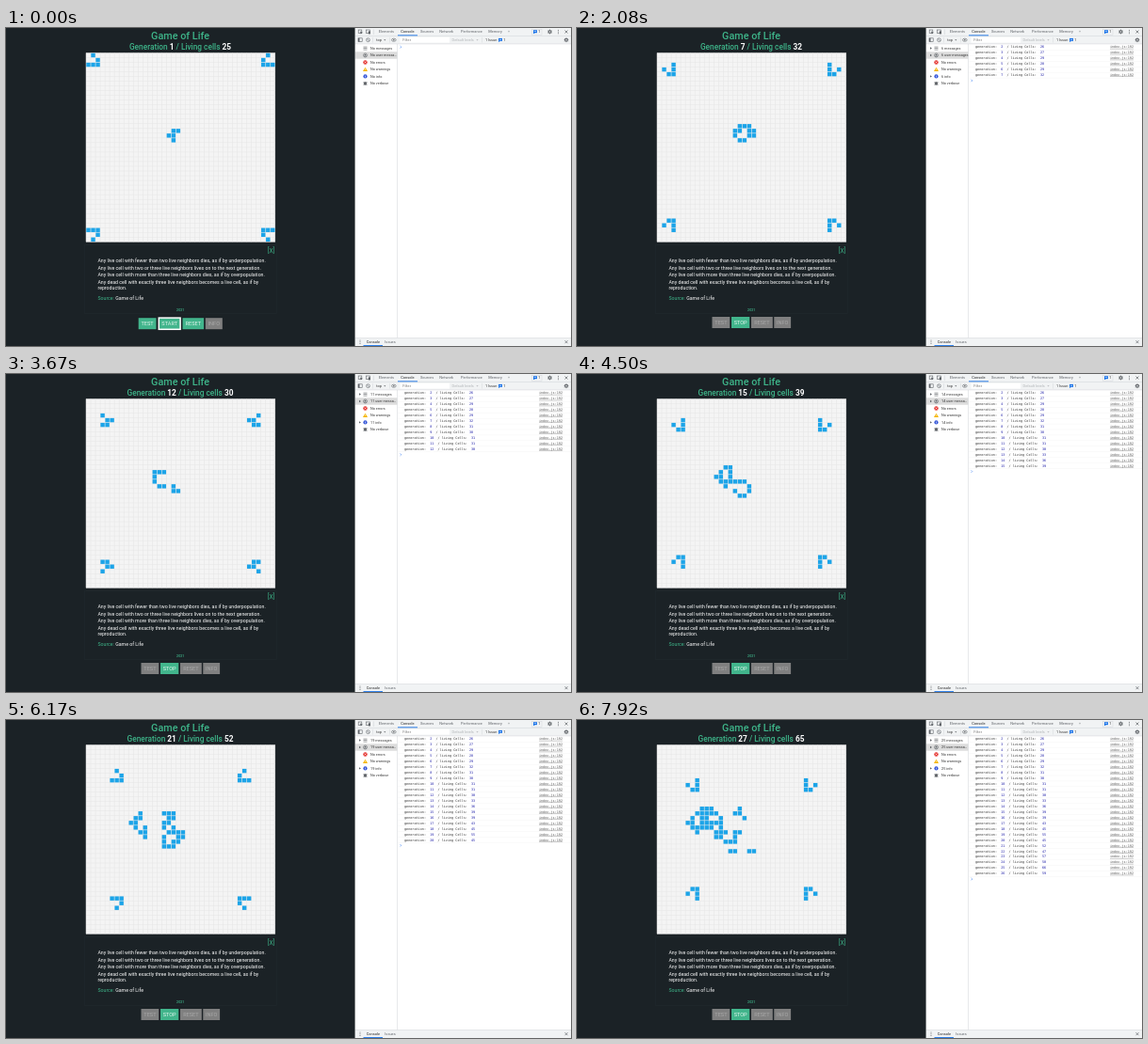
Write an HTML page with a canvas that moves like this. It is 600 by 338 pixels and loops after 8000 ms.

```html
<!DOCTYPE html>
<html lang="en">
<head>
<meta charset="utf-8">
<title>Game of Life</title>
<style>
  html, body { margin: 0; width: 100%; height: 100%; overflow: hidden; background: #1b2226; }
  canvas { display: block; width: 600px; height: 338px; }
</style>
</head>
<body>
<canvas id="stage"></canvas>
<script>
const LOOP = 8000, CLICK = 80, START = 100, STEP = 300, LOG_DELAY = 80;
const SIZE = 40, BOARD = { x: 85, y: 26.5, cell: 5.02 };
const SANS = 'Roboto, sans-serif', MONO = '"DejaVu Sans Mono", monospace';
const GREEN = '#3eb489', BLUE = '#1a73e8', GREY = '#5f6368', BAR = '#f1f3f4', LINE = '#cfd2d6';

const canvas = document.getElementById('stage');
const ratio = window.devicePixelRatio || 1;
canvas.width = 600 * ratio;
canvas.height = 338 * ratio;
const ctx = canvas.getContext('2d');
ctx.scale(ratio, ratio);

// --- simulation ---
function seed() {
  const cells = [[16, 18], [16, 19], [17, 17], [17, 18], [18, 18]];
  const glider = [[0, 1], [1, 2], [2, 0], [2, 1], [2, 2]];
  const far = SIZE - 1;
  for (const [r, c] of glider) {
    cells.push([r, c], [r, far - c], [far - r, c], [far - r, far - c]);
  }
  return new Set(cells.map(([r, c]) => r * SIZE + c));
}

function evolve(live) {
  const neighbours = new Map();
  for (const id of live) {
    const row = Math.floor(id / SIZE), col = id % SIZE;
    for (let r = row - 1; r <= row + 1; r++) {
      for (let c = col - 1; c <= col + 1; c++) {
        const key = r * SIZE + c;
        if (r < 0 || c < 0 || r >= SIZE || c >= SIZE || key === id) continue;
        neighbours.set(key, (neighbours.get(key) || 0) + 1);
      }
    }
  }
  const next = new Set();
  for (const [key, n] of neighbours) {
    if (n === 3 || (n === 2 && live.has(key))) next.add(key);
  }
  return next;
}

const generations = [null, seed()];
while (generations.length < 28) generations.push(evolve(generations.at(-1)));

const generationAt = t => Math.min(27, 1 + Math.max(0, Math.floor((t - START) / STEP)));

// --- drawing helpers ---
function rect(x, y, w, h, color) {
  ctx.fillStyle = color;
  ctx.fillRect(x, y, w, h);
}

// Draws text centred vertically on y and returns the x where it ends.
function text(str, x, y, size, color, { weight = 400, align = 'left', family = SANS } = {}) {
  ctx.font = `${weight} ${size}px ${family}`;
  ctx.textAlign = align;
  ctx.fillStyle = color;
  ctx.fillText(str, x, y + size * 0.355);
  return x + ctx.measureText(str).width;
}

function stroke(color, width, ...points) {
  ctx.strokeStyle = color;
  ctx.lineWidth = width;
  ctx.beginPath();
  points.forEach(([x, y]) => ctx.lineTo(x, y));
  ctx.stroke();
}

function box(x, y, w, h, color, width = 0.6) {
  ctx.strokeStyle = color;
  ctx.lineWidth = width;
  ctx.strokeRect(x, y, w, h);
}

function disc(x, y, r, color, outline) {
  ctx.beginPath();
  ctx.arc(x, y, r, 0, 2 * Math.PI);
  ctx.fillStyle = ctx.strokeStyle = color;
  ctx.lineWidth = outline || 0;
  if (outline) ctx.stroke(); else ctx.fill();
}

function triangle(color, ...points) {
  ctx.fillStyle = color;
  ctx.beginPath();
  points.forEach(([x, y]) => ctx.lineTo(x, y));
  ctx.fill();
}

function cross(x, y, r, color, width = 0.7) {
  stroke(color, width, [x - r, y - r], [x + r, y + r]);
  stroke(color, width, [x - r, y + r], [x + r, y - r]);
}

const dots = (x, y) => [-1.7, 0, 1.7].forEach(d => disc(x, y + d, 0.5, GREY));
const arrowDown = (x, y, color) => triangle(color, [x - 1.1, y - 0.6], [x + 1.1, y - 0.6], [x, y + 0.8]);

function gear(x, y) {
  for (let i = 0; i < 4; i++) {
    const a = i * Math.PI / 4, dx = 2.4 * Math.cos(a), dy = 2.4 * Math.sin(a);
    stroke(GREY, 0.8, [x - dx, y - dy], [x + dx, y + dy]);
  }
  disc(x, y, 1.8, GREY);
  disc(x, y, 0.8, BAR);
}

function issueBadge(x, y) {
  rect(x - 2, y - 1.8, 4, 3, BLUE);
  triangle(BLUE, [x - 2, y + 1], [x, y + 1], [x - 2, y + 2.2]);
  rect(x - 1.2, y - 0.6, 2.4, 0.5, '#fff');
  text('1', x + 3.3, y, 3.8, '#333');
}

// --- game page ---
function drawHeader(gen, count) {
  text('Game of Life', 185, 8.2, 10.8, GREEN, { weight: 500, align: 'center' });
  const parts = ['Generation ', gen, ' / Living cells ', count];
  const weight = i => (i % 2 ? 700 : 500);
  const width = parts.reduce((sum, part, i) => {
    ctx.font = `${weight(i)} 8.3px ${SANS}`;
    return sum + ctx.measureText(part).width;
  }, 0);
  let x = 185 - width / 2;
  parts.forEach((part, i) => {
    x = text(part, x, 20.2, 8.3, i % 2 ? '#fff' : GREEN, { weight: weight(i) });
  });
}

function drawBoard(live) {
  const { x, y, cell } = BOARD, side = SIZE * cell;
  rect(x, y, side, side, '#f4f4f4');
  for (let i = 0; i <= SIZE; i++) {
    rect(x + i * cell - 0.25, y, 0.5, side, '#e4e4e4');
    rect(x, y + i * cell - 0.25, side, 0.5, '#e4e4e4');
  }
  for (const id of live) {
    rect(x + (id % SIZE) * cell + 0.3, y + Math.floor(id / SIZE) * cell + 0.3, cell - 0.6, cell - 0.6, '#1ca4e8');
  }
}

function drawInfo() {
  box(83.5, 230.5, 204, 73, '#20292d');
  text('[X]', 281.5, 236.3, 6.6, GREEN, { align: 'center' });
  const rules = [
    [247.6, 'Any live cell with fewer than two live neighbors dies, as if by underpopulation.'],
    [255.1, 'Any live cell with two or three live neighbors lives on to the next generation.'],
    [262.6, 'Any live cell with more than three live neighbors dies, as if by overpopulation.'],
    [270.1, 'Any dead cell with exactly three live neighbors becomes a live cell, as if by'],
    [276.2, 'reproduction.']
  ];
  for (const [y, rule] of rules) text(rule, 97.4, y, 5.24, '#fff');
  const x = text('Source: ', 97.4, 287.2, 5.24, GREEN);
  text('Game of Life', x, 287.2, 5.24, '#fff');
  text('2021', 185.2, 299.7, 3.6, GREEN, { weight: 500, align: 'center' });
}

function drawButtons(running) {
  const y = running ? 307 : 308.2, h = 12;
  const buttons = running
    ? [['TEST', 143.5, 18.8, 0], ['STOP', 164, 19.3, 1], ['RESET', 185, 22.8, 0], ['INFO', 209.3, 17.8, 0]]
    : [['TEST', 140.7, 18.8, 1], ['START', 162.3, 22.8, 1], ['RESET', 187.5, 22.6, 1], ['INFO', 211.8, 18, 0]];
  for (const [label, x, w, enabled] of buttons) {
    rect(x, y, w, h, enabled ? '#42b58c' : '#808080');
    if (label === 'START') box(x, y - 0.1, w, h + 0.2, '#fff', 1.5);
    text(label, x + w / 2, y + h / 2, 5.6, enabled ? '#e2f5ed' : '#a9a9a9', { align: 'center' });
  }
}

// --- developer tools ---
function drawToolbars() {
  rect(371, 0, 229, 17, BAR);
  rect(371, 8.2, 229, 0.5, LINE);
  rect(371, 16.7, 229, 0.5, LINE);

  box(374.2, 2, 3.6, 3.6, GREY);
  triangle(GREY, [376, 3.6], [378.8, 4.8], [376.8, 6.6]);
  box(382.3, 2, 4, 3.6, GREY);
  rect(384.8, 3.4, 2.2, 3, GREY);
  rect(390, 1.5, 0.5, 5.5, LINE);
  const tabs = [['Elements', 395.8], ['Console', 419.3], ['Sources', 440], ['Network', 460.3],
    ['Performance', 483], ['Memory', 512.3], ['»', 533]];
  for (const [label, x] of tabs) text(label, x, 4, 3.95, label === 'Console' ? '#222' : GREY);
  rect(416, 7.4, 21, 0.9, BLUE);
  box(558.4, 1.2, 10.6, 6, LINE, 0.4);
  issueBadge(562, 4);
  gear(577.5, 4);
  dots(586.5, 4);
  cross(595, 4, 1.5, GREY);

  box(374, 10.8, 4.2, 3.8, GREY);
  rect(374, 10.8, 1.5, 3.8, GREY);
  disc(384.5, 12.7, 1.9, GREY, 0.6);
  stroke(GREY, 0.6, [383.2, 11.4], [385.8, 14]);
  rect(389.6, 9.8, 0.4, 5.8, LINE);
  text('top', 393.2, 12.7, 3.9, '#333');
  arrowDown(402.3, 12.8, GREY);
  rect(407, 9.8, 0.4, 5.8, LINE);
  ctx.beginPath();
  ctx.ellipse(411.8, 12.7, 2.4, 1.5, 0, 0, 2 * Math.PI);
  ctx.strokeStyle = GREY;
  ctx.lineWidth = 0.6;
  ctx.stroke();
  disc(411.8, 12.7, 0.8, GREY);
  rect(418.5, 9.8, 52.5, 5.8, '#fff');
  text('Filter', 421.3, 12.7, 3.9, '#757575');
  text('Default levels', 473.6, 12.7, 3.9, '#b0b3b6');
  arrowDown(500.5, 12.8, '#b0b3b6');
  rect(505, 9.8, 0.4, 5.8, LINE);
  text('1 Issue:', 509, 12.7, 3.8, '#333');
  issueBadge(525, 12.7);
  gear(595, 12.7);
}

function drawSidebar(count) {
  const n = count || 'No';
  const user = count > 0 && count < 10 ? 'user messages' : 'user messa…';
  const labels = [`${n} messages`, `${n} ${user}`, 'No errors', 'No warnings', `${n} info`, 'No verbose'];
  const rowY = i => 21.5 + i * 7.48;
  rect(371, 25.3, 44.5, 7.4, '#dcdcdc');
  labels.forEach((label, i) => {
    text(label, 387, rowY(i), 3.8, '#333');
    if (count && [0, 1, 4].includes(i)) {
      triangle(GREY, [375, rowY(i) - 1.2], [377, rowY(i)], [375, rowY(i) + 1.2]);
    }
  });

  const x = 381.5;
  [-1.5, 0, 1.5].forEach(d => rect(x - 2, rowY(0) + d - 0.25, 4, 0.6, GREY));
  disc(x, rowY(1), 2, GREY, 0.6);
  disc(x, rowY(1) - 0.5, 0.8, GREY);
  rect(x - 1.2, rowY(1) + 0.6, 2.4, 0.8, GREY);
  disc(x, rowY(2), 2.2, '#e53935');
  cross(x, rowY(2), 0.9, '#fff', 0.6);
  triangle('#f4b400', [x, rowY(3) - 2.2], [x + 2.5, rowY(3) + 2], [x - 2.5, rowY(3) + 2]);
  rect(x - 0.25, rowY(3) - 0.7, 0.5, 1.6, '#fff');
  disc(x, rowY(4), 2.1, '#3556d8');
  rect(x - 0.3, rowY(4) - 0.9, 0.6, 2, '#fff');
  disc(x, rowY(5), 1.6, GREY);
  [-1.3, 0, 1.3].forEach(d => rect(x - 2.2, rowY(5) + d - 0.2, 4.4, 0.4, GREY));
  rect(415.3, 17, 0.5, 312.5, LINE);
}

function drawLog(lastGen) {
  const rowY = i => 20.2 + i * 5.955;
  const mono = { family: MONO };
  for (let gen = 2; gen <= lastGen; gen++) {
    const y = rowY(gen - 2);
    let x = text('generation:  ', 423, y, 3.47, '#303030', mono);
    x = text(gen, x, y, 3.47, '#1a1aa6', mono);
    x = text('  / living Cells:  ', x, y, 3.47, '#303030', mono);
    text(generations[gen].size, x, y, 3.47, '#1a1aa6', mono);
    text('index.js:192', 591, y, 3.47, '#545454', { ...mono, align: 'right' });
    rect(566, y + 1.7, 25, 0.3, '#545454');
    rect(416, y + 2.9, 184, 0.3, '#ededed');
  }
  const y = rowY(lastGen - 1);
  stroke('#367cf1', 0.6, [418.6, y - 1.2], [419.8, y], [418.6, y + 1.2]);
}

function drawDrawer() {
  rect(371, 329.5, 229, 8.5, BAR);
  rect(371, 329.3, 229, 0.5, LINE);
  dots(376, 333.7);
  text('Console', 382.8, 333.6, 3.95, '#222');
  text('Issues', 402.3, 333.6, 3.95, GREY);
  rect(379.5, 337.1, 20.5, 0.9, BLUE);
  cross(595, 333.7, 1.5, GREY);
}

function draw(t) {
  const gen = generationAt(t), logged = generationAt(t - LOG_DELAY);
  rect(0, 0, 600, 338, '#1b2226');
  drawHeader(gen, generations[gen].size);
  drawBoard(generations[gen]);
  drawInfo();
  drawButtons(t >= CLICK);
  rect(370.6, 0, 229.4, 338, '#fff');
  drawToolbars();
  drawSidebar(logged - 1);
  drawLog(logged);
  drawDrawer();
}

const begin = performance.now();
function tick() {
  draw((performance.now() - begin) % LOOP);
  requestAnimationFrame(tick);
}
tick();
</script>
</body>
</html>
```
